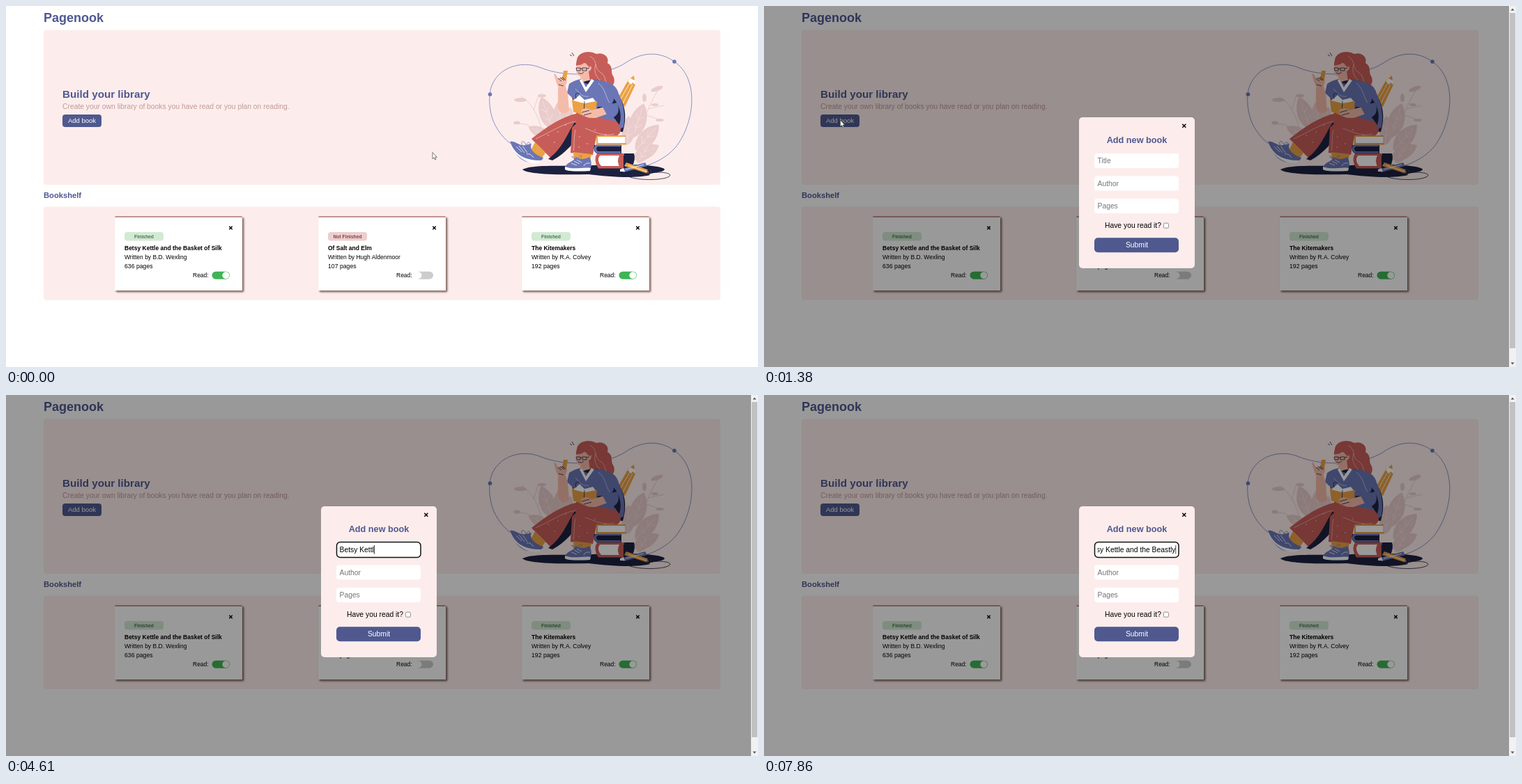
Animation, 1079 px wide and 519 px high, one loop 8000 ms. Source, as an HTML page:

```html
<!DOCTYPE html>
<html lang="en">
<head>
<meta charset="utf-8">
<title>Library</title>
<style>
html, body { margin: 0; width: 100%; height: 100%; overflow: hidden; }
svg { display: block; width: 1079px; height: 519px; font: 10.33px "Liberation Sans", Arial, sans-serif;
  --btn: #4f598f; --head: #4f5890 }
svg.hover { --btn: #6872b0 }
.w { fill: #fff } .p { fill: #fcedec } .r { fill: #c75d58 } .b { fill: #6b76b6 }
.n { fill: #1d2140 } .o { fill: #eba145 } .s { fill: #f5bba9 } .l { fill: #e9cccb }
.line { fill: none; stroke: #6f7abb; stroke-width: .8 }
.white { fill: none; stroke: #fff; stroke-width: .8 }
.ink { fill: none; stroke: #1d2140; stroke-width: .8 }
.twig { fill: none; stroke: #e9cccb; stroke-width: .9 }
.head { fill: var(--head); font-weight: bold }
.mid { text-anchor: middle }
.card { font-size: 8.5px }
.cross { stroke: #000; stroke-width: 1.5; fill: none }
.ph { fill: #757575 }
#typed { white-space: pre }
</style>
</head>
<body>
<svg id="stage" viewBox="0 0 1079 519">
  <defs>
    <filter id="soft" x="-10%" y="-10%" width="120%" height="120%"><feGaussianBlur stdDeviation=".8"/></filter>
    <clipPath id="field"><rect x="478.5" y="213" width="113" height="19"/></clipPath>
    <path id="leaf" d="M0 0C-13-10-12-30 0-42C12-30 13-10 0 0Z"/>
  </defs>
  <rect class="w" width="1079" height="519"/>
  <text class="head" x="54" y="23" font-size="18">Pagenook</text>
  <rect class="p" x="54" y="34.5" width="971" height="222.5" rx="4"/>
  <text class="head" x="81" y="131.5" font-size="15.2">Build your library</text>
  <text x="81" y="148" fill="#c19a97">Create your own library of books you have read or you plan on reading.</text>
  <rect x="81" y="156" width="56" height="18" rx="4" fill="var(--btn)"/>
  <text class="mid w" x="109" y="168.3" font-size="9.5">Add book</text>
  <text class="head" x="54" y="276" font-size="11.2">Bookshelf</text>
  <rect class="p" x="54" y="288.5" width="971" height="134.5" rx="4"/>

  <g id="art">
    <path class="line" d="M747 212C700 190 692 155 694 127C698 90 738 76 768 89C805 104 862 99 887 83C914 64 940 66 959 80C996 105 988 170 960 204C948 217 935 224 918 230"/>
    <circle class="b" cx="694.5" cy="127" r="2.8"/><circle class="b" cx="959" cy="80" r="2.8"/>
    <g id="leaves" class="l"></g>
    <path class="twig" d="M768 176C762 152 752 138 739 130M757 150L764 128M755 176C748 168 742 170 732 169M913 178C917 152 927 136 936 120M921 148L944 143M919 157L942 165"/>
    <g class="l">
      <ellipse cx="738" cy="135" rx="9" ry="3"/><ellipse cx="769" cy="129" rx="6" ry="2.5"/>
      <ellipse cx="733" cy="168" rx="5" ry="2.5"/><ellipse cx="934" cy="119" rx="9" ry="3.2" transform="rotate(-20 934 119)"/>
      <ellipse cx="931" cy="142" rx="5" ry="2"/><ellipse cx="938" cy="164" rx="6" ry="2"/>
      <ellipse cx="916" cy="132" rx="3" ry="6"/>
    </g>
    <path class="n" d="M741 235C755 227 804 231 843 229C890 226 943 229 945 235C944 240 917 240 924 243C906 248 866 246 836 242C797 243 747 242 741 235Z"/>
    <path class="ink" d="M895 246C914 252 952 250 953 243C951 239 938 239 928 239"/>

    <path class="o" d="M893 106L904 111L888 145L876 136Z"/>
    <path class="w" d="M901 100L904 114L899 110L897 113L892 108Z"/><path class="o" d="M901 100L902 107L896 104Z"/>
    <path class="white" d="M895 111L880 137M899 113L884 142"/>

    <path class="r" d="M819 78C820 66 837 63 847 69C858 66 866 74 863 82C871 86 868 94 870 99C876 107 872 118 862 118C850 123 837 115 833 106C838 99 836 91 834 84C825 88 816 86 819 78Z"/>
    <path class="white" d="M838 72C851 80 842 90 854 96C861 101 858 107 863 111M846 84C842 96 849 106 857 110" opacity=".55"/>
    <path class="s" d="M819 85C823 80 833 79 837 85C842 86 840 93 836 94L838 108L825 111L824 101C817 100 818 92 819 85Z"/>
    <path class="r" d="M818 86C817 77 826 74 837 78L839 88C833 87 834 81 829 82C825 86 821 84 818 86Z"/>
    <path class="ink" d="M818 89h6v4h-5zM827 89h6v4h-6zM824 90h3M833 90l4-1M821 96q5 3 8-1"/>

    <path class="n" d="M829 109C845 103 866 107 874 122C888 138 892 157 885 181L824 174L811 127Z"/>
    <path class="b" d="M808 112C815 107 821 106 825 105C832 116 841 112 844 106C863 108 876 112 879 126C886 140 889 157 886 174C873 184 853 180 836 172L820 139L805 125Z"/>
    <path class="n" d="M872 133C883 146 884 162 879 173C875 156 859 151 847 154L849 145C863 145 872 143 872 133Z"/>
    <path class="w" d="M823 107L832 124L844 107L840 105L832 117L826 105Z"/>
    <path class="white" d="M850 111C861 120 860 131 866 139M817 119C824 126 826 131 836 130" opacity=".6"/>
    <path class="s" d="M792 118L802 113L806 126L808 151C800 157 794 154 792 146Z"/>
    <path class="s" d="M790 111L786 98Q788 95 792 104L797 102Q804 100 805 109L802 116L793 118Z"/>
    <path class="o" d="M800 93L806 93L804 106L798 105Z"/>
    <path class="ink" d="M792 104l5 4M795 103l6 4M798 102l5 5M793 113l7 2"/>
    <path class="ink" d="M812 67l3 5M809 70l3 2"/>

    <path class="r" d="M876 166C887 177 883 189 863 190L817 176L784 221L754 191C780 170 804 156 824 154Z"/>
    <path class="n" d="M816 167C803 188 799 204 778 220L784 222C804 211 817 195 825 179Z"/>
    <path class="r" d="M812 175C825 159 857 162 875 179C879 190 865 193 847 188L842 214L810 211Z"/>
    <path class="white" d="M760 191C784 180 799 169 817 166M817 178C814 191 816 203 814 208M831 176C844 180 854 188 873 184" opacity=".55"/>
    <g class="w" id="dots" opacity=".8"></g>
    <path class="o" d="M759 196L774 211L767 221L751 211Z"/>
    <path class="b" d="M723 195C730 193 737 202 745 200L754 198C750 206 759 214 771 218C769 225 757 225 747 224C733 219 727 206 723 195Z"/>
    <path class="w" d="M723 195C730 213 742 222 768 222L764 226C741 228 724 207 723 195Z"/>
    <path class="white" d="M732 202l8 8M736 201l8 10M741 201l7 10M747 213q5-2 10 5"/>
    <path class="line" d="M742 202C735 192 746 193 746 201C750 190 757 200 746 204"/>
    <path class="o" d="M814 210L840 213L838 223L815 221Z"/>
    <path class="b" d="M802 232C805 224 815 224 818 217C824 222 831 220 837 217C841 223 840 232 838 236C825 238 806 238 802 232Z"/>
    <path class="w" d="M802 231C813 236 829 231 839 233L838 237C823 238 806 238 802 235Z"/>
    <path class="white" d="M811 226l8 3M815 223l8 4M819 221l7 4M829 230q2-5 9-4"/>
    <path class="line" d="M817 219C808 211 812 222 821 220C823 210 831 216 821 222"/>

    <path class="o" d="M812 135L823 131Q829 132 830 137L848 137L846 156L829 158L814 152Z"/>
    <path class="w" d="M814 136L823 128L830 135L842 132L846 137L830 140Z"/>
    <path class="ink" d="M830 137L829 156M818 133q-3-10 5-7"/>
    <path class="s" d="M825 150Q832 144 840 150L861 144L869 153L846 161Q830 162 825 154Z"/>
    <path class="ink" d="M826 153l11-3M829 157l11-3"/>
    <path class="b" d="M855 143L877 139Q883 155 870 161L863 158Z"/>

    <path class="o" d="M847 186H889V188H849V197H890V199.500H847Z"/><rect class="w" x="849" y="188" width="39" height="9"/>
    <path class="n" d="M844 200H883V212H848Q842 209 844 200Z"/>
    <path class="b" d="M846 199.500H882V202H849Q845 205 849 209H882V211.500H848Q841 206 846 199.500Z"/>
    <path class="n" d="M882 212H901Q904 220 898 232H881Z"/>
    <path class="r" d="M848 212H887V215H854Q848 222 854 230H886V233.500H850Q842 222 848 212Z"/>
    <path class="w" d="M852 215H880Q876 223 880 230H854Q847 222 852 215Z"/>
    <path class="r" d="M880 215H886V230H880Q876 223 880 215Z"/>
    <path class="b" d="M881 235L917 225L920 230L886 239Z"/><path class="w" d="M881 235l5-2 2 5-7 0Z"/>
    <path class="o" d="M890 225L926 237L924 242L887 230Z"/><path class="n" d="M926 237l-5-2-2 5 5 2Z"/>
    <path class="white" d="M893 229L922 239M889 235L915 228"/>
  </g>

  <g id="shelf"></g>

  <g id="modal">
    <rect width="1079" height="519" opacity=".4"/>
    <rect x="452" y="160" width="166" height="217" rx="5" fill="#fcedec"/>
    <path class="cross" d="M600.300 169.800l5 5m0-5l-5 5"/>
    <text class="mid head" x="535" y="197" font-size="12.7">Add new book</text>
    <g fill="#fff">
      <rect x="474" y="212" width="121" height="21" rx="4"/>
      <rect x="474" y="244.500" width="121" height="21" rx="4"/>
      <rect x="474" y="277" width="121" height="21" rx="4"/>
    </g>
    <rect id="ring" x="474.500" y="211.500" width="120.500" height="22" rx="5" fill="none" stroke="#101010" stroke-width="1.500"/>
    <text class="ph" id="hint" x="478.500" y="226">Title</text>
    <text class="ph" x="478.500" y="258.500">Author</text>
    <text class="ph" x="478.500" y="291">Pages</text>
    <g clip-path="url(#field)">
      <text id="typed" y="226"></text>
      <rect id="caret" y="216" width=".9" height="12.500"/>
    </g>
    <text x="489" y="319">Have you read it?</text>
    <rect x="573.400" y="312.200" width="7" height="7" rx="1.300" fill="#fff" stroke="#767676" stroke-width=".8"/>
    <rect x="474" y="333.300" width="121" height="21" rx="5" fill="#4f598f"/>
    <text class="mid w" x="535" y="347.300">Submit</text>
    <rect x="1069" width="10" height="519" fill="#f1f1f1"/>
    <rect x="1070" y="10" width="8" height="482" fill="#c1c1c1"/>
    <path d="M1071.500 6.500l2.500-3 2.500 3zM1071.500 512.500l2.500 3 2.500-3z" fill="#555"/>
  </g>
  <path id="arrow" d="M0 0V9.300L2.100 7.400L3.500 10.600L5 10L3.600 6.900H6.300Z" fill="#fff" stroke="#444" stroke-width=".7"/>
  <path id="hand" d="M-1 1Q0-1 1.200 1V5.500L4.500 6.300Q6.200 7 5.500 10L4.500 13H-.5L-3.500 8.500Q-3.500 6.500-1 8Z" fill="#fff" stroke="#444" stroke-width=".6"/>
</svg>
<script>
const $ = id => document.getElementById(id);
const stage = $('stage');

const finished = {label: 'Finished', pill: '#d2ead3', ink: '#4b7550', track: '#3fb455', knob: 159.4};
const unfinished = {label: 'Not Finished', pill: '#ebcfcf', ink: '#8a4045', track: '#ccc', knob: 143.5};

const card = (x, title, author, pages, state) => `
  <g class="card" transform="translate(${x} 302)">
    <rect x="1.500" y="2" width="184" height="107.500" rx="2" fill="#8a7069" filter="url(#soft)"/>
    <rect width="183" height="107" rx="2" fill="#c19391"/>
    <path class="w" d="M0 2H183V107H0Z"/>
    <path class="cross" d="M164.300 14.800l4.400 4.400m0-4.400l-4.400 4.400"/>
    <rect x="14" y="23" width="56" height="12.500" rx="4" fill="${state.pill}"/>
    <text class="mid" x="42" y="31.700" font-size="6.800" font-weight="bold" fill="${state.ink}">${state.label}</text>
    <text x="14" y="49" font-weight="bold">${title}</text>
    <text x="14" y="62">Written by ${author}</text>
    <text x="14" y="75" font-size="8.700">${pages} pages</text>
    <text x="112" y="87.700">Read:</text>
    <rect x="139.500" y="79.700" width="25.500" height="11" rx="5.500" fill="${state.track}"/>
    <circle class="w" cx="${state.knob}" cy="85.200" r="5"/>
  </g>`;
$('shelf').innerHTML =
  card(156, 'Betsy Kettle and the Basket of Silk', 'B.D. Wexling', 636, finished) +
  card(448, 'Of Salt and Elm', 'Hugh Aldenmoor', 107, unfinished) +
  card(740, 'The Kitemakers', 'R.A. Colvey', 192, finished);

// x, y, angle, scale
$('leaves').innerHTML = [
  [785, 178, -20, 1.2], [795, 176, 0, 1], [780, 188, -65, .8], [803, 178, 12, .8],
  [899, 190, 18, 1.25], [903, 208, 42, 1.2], [900, 220, 62, 1], [892, 200, 2, 1], [906, 226, 32, .9]
].map(([x, y, a, s]) => `<g transform="translate(${x} ${y}) rotate(${a}) scale(${s})"><use href="#leaf"/>
  <path class="white" d="M0 0V-36M0-12l-6-6M0-12l6-6M0-22l-5-6M0-22l5-6" opacity=".35"/></g>`).join('');
$('dots').innerHTML = [[778, 186], [792, 181], [787, 196], [803, 171], [823, 188], [834, 198], [822, 203], [845, 178], [860, 185]]
  .map(([x, y]) => `<circle cx="${x}" cy="${y}" r=".7"/>`).join('');

const words = 'Betsy Kettle and the Beastly';
const keys = [2510, 2990, 3150, 3310, 3480, 3640, 3880,
  ...Array.from({length: 9}, (_, i) => 4130 + i * 128.75),
  5330, 5490, 5610, 5730, 5860, 5980, 6310, 6470, 6800, 7040, 7620, 7860];

const show = (id, on) => $(id).style.display = on ? '' : 'none';
const glide = (t, a, b) => { const k = Math.min(1, Math.max(0, (t - a) / (b - a))); return k * k * (3 - 2 * k); };
const mix = (a, b, k) => a + (b - a) * k;

function draw(t) {
  const open = t >= 1380, focus = t >= 2010, over = t >= 1050 && !open;
  stage.setAttribute('class', over ? 'hover' : '');
  show('modal', open);
  show('ring', focus);

  const k = glide(t, 50, 1050), m = glide(t, 1450, 1950);
  const x = open ? mix(109.5, 500, m) : mix(612, 109.5, k);
  const y = open ? mix(164, 220, m) : mix(210.5, 164, k);
  for (const id of ['arrow', 'hand']) $(id).setAttribute('transform', `translate(${x} ${y})`);
  show('arrow', !over && !focus);
  show('hand', over);

  const count = keys.filter(at => at <= t).length;
  show('hint', !count);
  const typed = $('typed');
  typed.textContent = words.slice(0, count);
  const width = count ? typed.getComputedTextLength() : 0;
  const left = 478.5 - Math.max(0, width - 112);
  typed.setAttribute('x', left);
  $('caret').setAttribute('x', left + width);
  const idle = t - (count ? keys[count - 1] : 2010);
  show('caret', focus && idle < 500);
}

const start = performance.now();
(function tick() {
  draw((performance.now() - start) % 8000);
  requestAnimationFrame(tick);
})();
</script>
</body>
</html>
```
